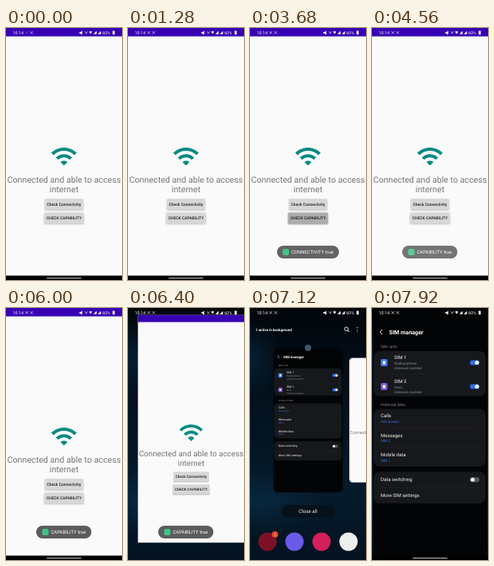
An HTML page that plays this animation: 146x316 px, repeating every 8 s.

```html
<!DOCTYPE html>
<html lang="en">
<head>
<meta charset="utf-8">
<title>Connectivity check</title>
<style>
html, body { margin: 0; width: 100%; height: 100%; overflow: hidden; background: #000; }
svg { display: block; width: 100vw; height: 100vh; }
text { font-family: Roboto, "Open Sans", sans-serif; text-rendering: geometricPrecision; }
.mid { text-anchor: middle; }
.head { font-size: 10.7px; fill: #757575; }
.btn { font-size: 5px; font-weight: 500; fill: #1c1c1c; }
.toast { font-size: 5.95px; fill: #fff; }
.item { font-size: 6px; fill: #f2f2f2; }
.note { font-size: 4.5px; fill: #8d8f93; }
.link { font-size: 4.6px; fill: #3f72e0; }
.label { font-size: 4.7px; fill: #8d8f93; }
.panel { fill: #16181b; }
.rule { stroke: #2b2d31; stroke-width: .4; }
.line { fill: none; stroke: #fff; }
</style>
</head>
<body>
<svg viewBox="0 0 146 316" preserveAspectRatio="none">
  <defs>
    <linearGradient id="night" x2="0" y2="1">
      <stop offset="0" stop-color="#01060b"/>
      <stop offset=".35" stop-color="#03111d"/>
      <stop offset=".75" stop-color="#051b2c"/>
      <stop offset="1" stop-color="#041220"/>
    </linearGradient>
    <radialGradient id="glow">
      <stop offset="0" stop-color="#0b3a5c" stop-opacity=".4"/>
      <stop offset="1" stop-color="#0b3a5c" stop-opacity="0"/>
    </radialGradient>
    <clipPath id="appClip"><rect id="appShape" width="146"/></clipPath>
    <filter id="soft" x="-20%" y="-40%" width="140%" height="200%"><feGaussianBlur stdDeviation=".8"/></filter>
  </defs>

  <rect width="146" height="316" fill="url(#night)"/>
  <ellipse cx="14" cy="242" rx="75" ry="42" fill="url(#glow)"/>
  <ellipse cx="4" cy="62" rx="34" ry="50" fill="url(#glow)"/>

  <g id="recents">
    <text x="7" y="28.7" font-size="4.5" font-weight="600" fill="#fff">1 active in background</text>
    <g class="line" stroke-width=".9">
      <circle cx="121.3" cy="26.3" r="2.3"/><path d="M123 28l2 2"/>
    </g>
    <g fill="#fff"><circle cx="135" cy="24.4" r=".6"/><circle cx="135" cy="27" r=".6"/><circle cx="135" cy="29.6" r=".6"/></g>
    <rect x="39.5" y="247" width="67" height="16" rx="8" fill="#07111a"/>
    <text class="mid" x="73" y="257.2" font-size="6.2" fill="#f2f2f2">Close all</text>
    <circle cx="22" cy="293" r="11.5" fill="#7d1226"/>
    <circle cx="31.5" cy="284" r="4" fill="#e2482f"/>
    <text class="mid" x="31.5" y="285.7" font-size="4.6" fill="#fff">1</text>
    <circle cx="56" cy="293" r="11.5" fill="#6a5be8"/>
    <circle cx="90" cy="293" r="11.5" fill="#d3205a"/>
    <circle cx="124" cy="293" r="11.5" fill="#eef0ee"/>
  </g>

  <g id="sim">
    <rect id="simBg" x="1" width="144" fill="#030405"/>
    <path class="line" d="M13 27l-3 3 3 3" stroke-width=".9"/>
    <text x="21.5" y="32.5" font-size="7.2" font-weight="600" fill="#fff">SIM manager</text>
    <text class="label" x="11" y="49.5">SIM cards</text>
    <rect class="panel" x="2" y="54" width="141" height="56.5" rx="8"/>
    <g id="cards"></g>
    <path class="rule" d="M28 83H135"/>
    <text class="label" x="11" y="122.7">Preferred SIMs</text>
    <rect class="panel" x="2" y="126.5" width="141" height="72.5" rx="8"/>
    <g id="prefs"></g>
    <path class="rule" d="M11 150H135M11 175H135"/>
    <rect class="panel" x="2" y="205.5" width="141" height="39.5" rx="8"/>
    <text class="item" x="11" y="217.2">Data switching</text>
    <rect x="123.3" y="212.2" width="12" height="6.2" rx="3.1" fill="#55575b"/>
    <circle cx="126.6" cy="215.3" r="2.5" fill="#f4f4f4"/>
    <path class="rule" d="M11 225.5H135"/>
    <text class="item" x="11" y="237.2">More SIM settings</text>
  </g>
  <circle id="badge" cx="73" cy="50" r="4" fill="#3c586e"/>

  <g id="app"><g clip-path="url(#appClip)">
    <rect width="146" height="316" fill="#fafafa"/>
    <rect width="146" height="10.5" fill="#3700b3"/>
    <path fill="#078a85" transform="translate(55.5 143.5) scale(1.455)" d="M1 9l2 2c4.97-4.97 13.03-4.97 18 0l2-2C16.93 2.93 7.08 2.93 1 9zm8 8l3 3 3-3c-1.65-1.66-4.34-1.66-6 0zm-4-4l2 2c2.76-2.76 7.24-2.76 10 0l2-2C15.14 9.14 8.87 9.14 5 13z"/>
    <text class="head mid" x="73" y="193.7">Connected and able to access</text>
    <text class="head mid" x="73" y="206.2">internet</text>
    <g id="buttons"></g>
  </g></g>

  <g id="nav">
    <rect y="310.5" width="146" height="5.5"/>
    <rect x="51" y="312.9" width="44" height="1.3" rx=".65" fill="#a9a9a9"/>
  </g>

  <g id="toast1">
    <rect x="34" y="273" width="78" height="16" rx="8" fill="#636363"/>
    <rect x="41" y="277" width="8" height="8" rx="1.8" fill="#3cc584"/>
    <text class="toast" x="52" y="283.1">CONNECTIVITY true</text>
  </g>
  <g id="toast2">
    <rect x="38" y="273" width="69.5" height="16" rx="8" fill="#5c5c5c"/>
    <rect x="45.5" y="277" width="8" height="8" rx="1.8" fill="#3cc584"/>
    <text class="toast" x="56.5" y="283.1">CAPABILITY true</text>
  </g>

  <g id="status" fill="#fff">
    <text x="8.5" y="7.8" font-size="5.4">10:14</text>
    <g class="line" stroke-width=".6">
      <path id="tool" d="M24.5 4l3.4 3.6m0-3.6l-3.4 3.6"/>
      <path d="M30.5 4l3.6 3.6m0-3.6l-3.6 3.6"/>
      <path d="M99.5 4.2l1.5 3 1.5-3"/>
    </g>
    <path d="M92.5 5h1.5l2-1.5v5l-2-1.5h-1.5zM104.5 4.8q2-1.6 4 0l-2 2.8zM114 3.8v4h-4zM119.5 3.8v4h-4z"/>
    <text x="121.3" y="7.9" font-size="5.2">60%</text>
    <rect x="134.2" y="3.6" width="2.6" height="4.6" rx=".5"/>
  </g>
</svg>
<script>
const $ = id => document.getElementById(id);
const put = (id, attrs) => { for (const k in attrs) $(id).setAttribute(k, attrs[k]); };

$('cards').innerHTML = [
  ['SIM 1', 'Nodipurphone', 62, '#3f78ea'],
  ['SIM 2', 'tavro', 92, '#7d58cf']
].map(([name, carrier, y, color]) => `
  <rect x="11" y="${y + 2}" width="8.5" height="9" rx="2" fill="${color}"/>
  <rect x="13.6" y="${y + 4.6}" width="3.3" height="3.8" rx=".5" fill="#fff"/>
  <text class="item" x="28" y="${y + 2.1}">${name}</text>
  <text class="note" x="28" y="${y + 8.6}">${carrier}</text>
  <text class="note" x="28" y="${y + 15.4}">Unknown number</text>
  <rect x="123.3" y="${y + 3.4}" width="12" height="6.2" rx="3.1" fill="#2e6cf0"/>
  <circle cx="132" cy="${y + 6.5}" r="2.5" fill="#fff"/>`).join('');

$('prefs').innerHTML = [
  ['Calls', 'Ask always', 135], ['Messages', 'SIM 2', 159.5], ['Mobile data', 'SIM 1', 184]
].map(([name, value, y]) => `
  <text class="item" x="11" y="${y + 2.1}">${name}</text>
  <text class="link" x="11" y="${y + 8.5}">${value}</text>`).join('');

$('buttons').innerHTML = [
  ['Check Connectivity', 49, 214.3, 48], ['CHECK CAPABILITY', 48, 231.6, 50]
].map(([name, x, y, w], i) => `
  <rect id="shade${i}" x="${x}" y="${y + 1}" width="${w}" height="13.4" rx="1" filter="url(#soft)"/>
  <rect x="${x}" y="${y}" width="${w}" height="13.4" rx=".7" fill="#d6d7d7"/>
  <rect id="press${i}" x="${x}" y="${y}" width="${w}" height="13.4" rx=".7"/>
  <text class="btn mid" x="73" y="${y + 8.5}">${name}</text>`).join('');

// Each row: time, then values
const tracks = {
  app: [[6040, 0, 0, 1], [6720, 22.5, 14.6, .855], [7080, 125, 57, .52], [7400, 125, 57, .52], [7840, 190, 30, .8]],
  sim: [[6040, -166, 0, 1], [6720, -122, 14.6, .855], [7080, 29, 43, .605], [7400, 29, 43, .605], [7900, 0, 0, 1]],
  crop: [[6040, 0], [6720, .15], [7080, 1], [7400, 1], [7860, 0]],
  corner: [[6040, 0], [6720, 1], [7080, 8]],
  recents: [[6800, 0], [7080, 1], [7400, 1], [7640, 0]],
  nav: [[6040, 1], [6200, 0], [7640, 0], [7860, 1]],
  toast1: [[1840, 0], [2160, 1], [4000, 1], [4240, 0]],
  toast2: [[4320, 0], [4640, 1], [6720, 1], [6920, 0]],
  press0: [[1440, 0], [1520, .2], [1680, .2], [1920, 0]],
  press1: [[3560, 0], [3680, .2], [3920, .2], [4160, 0]],
  tool: [[80, .4], [160, 1]]
};

function at(name, t) {
  const rows = tracks[name], i = rows.findIndex(r => r[0] > t);
  if (i === 0) return rows[0].slice(1);
  if (i < 0) return rows[rows.length - 1].slice(1);
  const a = rows[i - 1], b = rows[i];
  const p = (t - a[0]) / (b[0] - a[0]), e = p * p * (3 - 2 * p);
  return a.slice(1).map((v, k) => v + (b[k + 1] - v) * e);
}

function draw(t) {
  for (const id of ['app', 'sim']) {
    const [x, y, s] = at(id, t);
    put(id, { transform: `translate(${x} ${y}) scale(${s})` });
  }
  const [crop] = at('crop', t), [corner] = at('corner', t);
  put('appShape', { y: 10.5 * crop, height: 311 - 10.5 * crop, rx: corner });
  put('simBg', { y: 13 * crop, height: 316 - 18 * crop, rx: corner });
  for (const id of ['recents', 'nav', 'toast1', 'toast2', 'tool']) put(id, { opacity: at(id, t)[0] });
  put('badge', { opacity: at('recents', t)[0] });
  for (const i of [0, 1]) {
    const [p] = at('press' + i, t);
    put('press' + i, { opacity: p });
    put('shade' + i, { opacity: .25 + p });
  }
}

const start = performance.now();
function tick() {
  draw((performance.now() - start) % 8000);
  requestAnimationFrame(tick);
}
tick();
</script>
</body>
</html>
```
